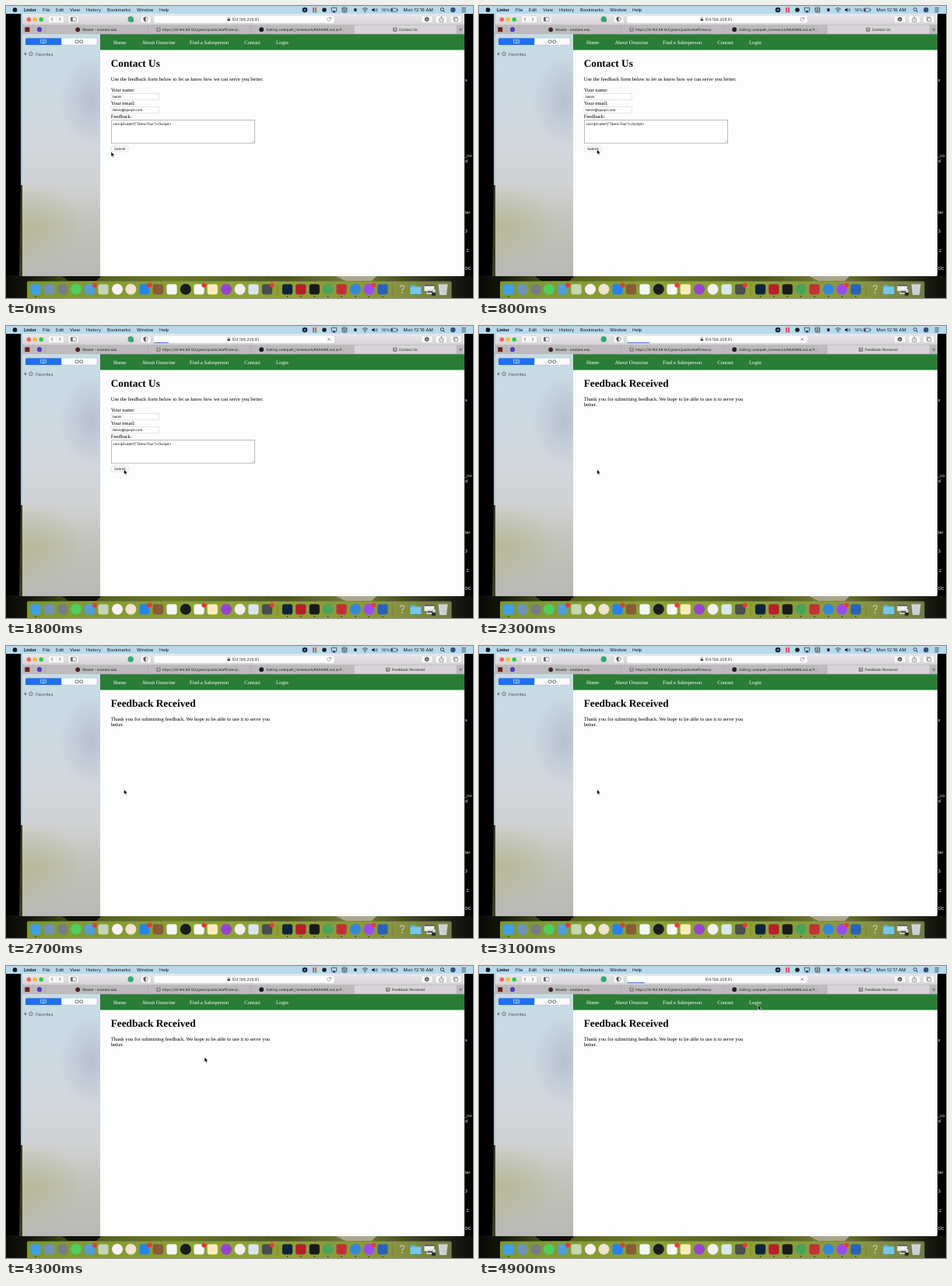
Animation of 600x375 px, one loop 5000 ms. Source, as an HTML page:

```html
<!DOCTYPE html>
<html lang="en">
<head>
<meta charset="utf-8">
<title>Feedback form</title>
<style>
  html, body { margin: 0; width: 100%; height: 100%; overflow: hidden; background: #000; }
  svg { display: block; width: 100vw; height: 100vh; }
  text { font-family: Inter, "Liberation Sans", sans-serif; text-rendering: geometricPrecision; white-space: pre; }
  .serif { font-family: "Liberation Serif", "Noto Serif", serif; }
</style>
</head>
<body>
<svg id="stage" viewBox="0 0 600 375" preserveAspectRatio="none">
  <defs>
    <linearGradient id="bar" x2="0" y2="1">
      <stop stop-color="#e9e7e9"/><stop offset="1" stop-color="#d5d3d5"/>
    </linearGradient>
    <linearGradient id="side" x2="0" y2="1">
      <stop stop-color="#c6dce6"/><stop offset=".25" stop-color="#cbd9e1"/>
      <stop offset=".45" stop-color="#d2d7dc"/><stop offset=".62" stop-color="#d0d2d3"/>
      <stop offset=".8" stop-color="#c0c1ba"/><stop offset="1" stop-color="#b9b8b5"/>
    </linearGradient>
    <radialGradient id="moss">
      <stop stop-color="#b4b78c" stop-opacity=".75"/><stop offset="1" stop-color="#b4b78c" stop-opacity="0"/>
    </radialGradient>
    <radialGradient id="mist">
      <stop stop-color="#b4bccd" stop-opacity=".85"/><stop offset="1" stop-color="#b4bccd" stop-opacity="0"/>
    </radialGradient>
    <linearGradient id="grass">
      <stop stop-color="#080907"/><stop offset=".05" stop-color="#14170b"/>
      <stop offset=".15" stop-color="#4a5620"/><stop offset=".35" stop-color="#6b7a28"/>
      <stop offset=".6" stop-color="#4b5621"/><stop offset=".75" stop-color="#77803a"/>
      <stop offset=".92" stop-color="#2b2a1a"/><stop offset="1" stop-color="#0c0d09"/>
    </linearGradient>
    <linearGradient id="dock">
      <stop stop-color="#7f9730"/><stop offset=".5" stop-color="#8fa338"/>
      <stop offset=".85" stop-color="#8a9640"/><stop offset="1" stop-color="#6f7a48"/>
    </linearGradient>
    <clipPath id="sideClip"><rect x="21" y="36" width="100" height="311"/></clipPath>
  </defs>
</svg>
<script>
const NS = 'http://www.w3.org/2000/svg';
const stage = document.getElementById('stage');
let parent = stage;

function add(tag, attrs, content) {
  const el = document.createElementNS(NS, tag);
  for (const key in attrs) el.setAttribute(key, attrs[key]);
  if (content !== undefined) el.textContent = content;
  return parent.appendChild(el);
}
const rect = (x, y, width, height, fill, rx = 0, more) => add('rect', { x, y, width, height, fill, rx, ...more });
const circle = (cx, cy, r, fill, more) => add('circle', { cx, cy, r, fill, ...more });
const line = (d, stroke, width = 0.7, more) =>
  add('path', { d, stroke, 'stroke-width': width, fill: 'none', ...more });
const shape = (d, fill, more) => add('path', { d, fill, ...more });
const label = (x, y, size, str, fill = '#222', more) =>
  add('text', { x, y, 'font-size': size, fill, ...more }, str);
const serif = (x, y, str, size = 6.65, fill = '#000', more) =>
  label(x, y, size, str, fill, { class: 'serif', ...more });
function group(draw) {
  const outer = parent, g = add('g', {});
  parent = g;
  draw();
  parent = outer;
  return g;
}
const show = (el, on) => el.setAttribute('visibility', on ? 'visible' : 'hidden');

function desktop() {
  rect(0, 0, 600, 375, '#000');
  rect(0, 346, 600, 29, 'url(#grass)');
  rect(19, 10, 2.5, 220, '#a8c6d6');
  shape('M19 230H22V347H17Z', '#3a4020');
  shape('M72 347L80 353H116L122 347Z', '#0e100a');
  shape('M424 347L436 353H470L476 347Z', '#aaa68a');
  const clipped = [[97, 's'], [194, '_co'], [201, 'd'], [267, 'ter'], [291, '3'], [316, ' 2'], [339, 'OC']];
  for (const [y, str] of clipped) label(589.5, y, 5.6, str, '#f2f2f2');
}

function menuBar() {
  rect(0, 0, 600, 10, '#b6d9ee');
  circle(11.5, 4.9, 2.9, '#1b1b1b');
  label(23, 7, 5.7, 'Lintor', '#111', { 'font-weight': 700 });
  const menus = [[47, 'File'], [64, 'Edit'], [82, 'View'], [103, 'History'],
    [130, 'Bookmarks'], [168, 'Window'], [197, 'Help']];
  for (const [x, str] of menus) label(x, 7, 5.65, str, '#111');

  const ink = '#1c2026';
  circle(384, 5, 3.3, ink);
  circle(384, 5, 1.3, '#4a90d8');
  rect(394.3, 1.8, 1.6, 6.6, '#d8392f');
  rect(397.2, 1.8, 1.6, 6.6, '#d8392f');
  circle(409, 5, 2.8, ink);
  line('M419.5 6.7H418.3V2.2H424.7V6.7H423.5', ink);
  shape('M421.5 5.2L423.8 8.3H419.2Z', ink);
  rect(432, 2, 5.8, 6, 'none', 0.8, { stroke: ink, 'stroke-width': 0.7 });
  line('M432 3.8H437.8M433.4 5.4H436.4M433.4 6.7H436.4', ink, 0.6);
  rect(447.3, 3.2, 3.2, 3.6, ink);
  line('M457.8 4.2Q461.3 .9 464.8 4.2M459.1 5.6Q461.3 3.5 463.5 5.6', ink, 0.8);
  circle(461.3, 7.1, 0.8, ink);
  shape('M470 4H471.4L473.4 2.2V7.8L471.4 6H470Z', ink);
  line('M474.5 3.5Q475.7 5 474.5 6.5M476 2.5Q477.9 5 476 7.5', ink, 0.6);
  label(482.6, 7, 5.2, '18%', ink);
  rect(494.3, 3, 8, 4.2, 'none', 0.7, { stroke: ink, 'stroke-width': 0.6 });
  rect(495, 3.7, 1.7, 2.8, ink);
  rect(502.7, 4.2, 0.8, 1.8, ink);
  circle(560.4, 4.4, 2, 'none', { stroke: ink, 'stroke-width': 0.8 });
  line('M561.9 5.9L563.6 7.8', ink, 0.9);
  circle(574.3, 5, 3.2, '#3d4a78');
  line('M585.5 2.6H591M585.5 5H591M585.5 7.4H591', ink, 0.8);
  return label(510.5, 7, 5.8, '', '#111');
}

function toolbar() {
  rect(21, 10, 568, 337, '#fdfdfd', 2);
  rect(21, 10, 568, 14.5, 'url(#bar)');
  ['#f95e56', '#f8bc32', '#2fc644'].forEach((c, i) => circle(29.3 + i * 8, 17.2, 2.7, c));
  const button = (x, w) => rect(x, 12.6, w, 9, '#fafafa', 1.5, { stroke: '#c4c2c4', 'stroke-width': 0.4 });
  button(54.5, 20);
  button(80, 13.3);
  button(173, 13);
  button(533.5, 14.5);
  button(552, 14.5);
  button(570.5, 14.5);
  const ink = '#555';
  line('M60.2 14.9L58.2 17.1L60.2 19.3M68 14.9L70 17.1L68 19.3', ink, 0.8);
  line('M64.5 13V21.5', '#d2d2d2', 0.4);
  rect(83.2, 14.6, 7, 5, 'none', 0.4, { stroke: ink, 'stroke-width': 0.6 });
  rect(83.4, 14.8, 2.2, 4.6, ink);
  line('M179.4 14L182 15V17.2Q181.8 19.2 179.4 20.3Q177 19.2 176.8 17.2V15Z', ink, 0.6);
  shape('M179.4 14V20.3Q177 19.2 176.8 17.2V15Z', ink);
  rect(190, 12.3, 232, 9.6, '#fff', 1.6, { stroke: '#c9c7c9', 'stroke-width': 0.4 });
  label(290, 19, 5.1, '104.198.208.81', '#333');
  circle(540.7, 17.1, 2.8, ink);
  line('M540.7 15.4V18.4M539.5 17.3L540.7 18.5L541.9 17.3', '#fff', 0.6);
  line('M558 16H556.8V20H561.8V16H560.6M559.3 18.2V13.8M558 15L559.3 13.8L560.6 15', ink, 0.6);
  line('M576.2 18.3H575.2V14.2H579.4V15.2', ink, 0.6);
  rect(576.3, 15.4, 4.3, 4.4, 'none', 0.3, { stroke: ink, 'stroke-width': 0.6 });
}

function tabBar() {
  rect(21, 24.3, 568, 11.9, '#bcbabc');
  rect(447, 24.3, 132.2, 11.9, '#d6d4d6');
  line('M21 24.4H589M21 36H589', '#a4a2a4', 0.4);
  for (const x of [35, 50, 182.3, 314.6, 447, 579.2]) line(`M${x} 24.5V36`, '#a09ea0', 0.4);
  rect(24.3, 27.2, 6, 6, '#6d1d22');
  circle(43, 30.2, 3.1, '#5b35c5');
  circle(92.2, 30.3, 2.9, '#46261d');
  label(98, 32, 4.45, 'Wexlet - msstate.edu');
  pageIcon(196);
  label(201, 32, 4.45, 'https://35.184.88.143/green/public/staff/users/...');
  circle(328.2, 30.2, 2.9, '#1c1c1e');
  label(334.6, 32, 4.45, 'Editing codepath_homework/README.md at P...');
  line('M584.2 28V32.4M582 30.2H586.4', '#555', 0.6);
}

function pageIcon(x) {
  rect(x - 2.7, 27.5, 5.4, 5.4, '#89878b', 0.8);
  line(`M${x - 0.6} 29L${x + 0.2} 28.6V31.8`, '#fff', 0.6);
}

function sidebar() {
  rect(21, 36.2, 100, 310.8, 'url(#side)');
  const glow = (cx, cy, rx, ry, id) =>
    add('ellipse', { cx, cy, rx, ry, fill: `url(#${id})`, 'clip-path': 'url(#sideClip)' });
  glow(110, 122, 42, 60, 'mist');
  glow(30, 282, 70, 55, 'moss');
  rect(25, 41.2, 92, 8.8, '#fbfbfb', 1.6, { stroke: '#b5b9be', 'stroke-width': 0.4 });
  shape('M26.6 41.2H71.2V50H26.6Q25 50 25 48.4V42.8Q25 41.2 26.6 41.2Z', '#2070f2');
  line('M48 44.1V47.9Q46.3 46.9 44.6 47.5V43.7Q46.3 43.2 48 44.1Q49.7 43.2 51.4 43.7V47.5Q49.7 46.9 48 47.9', '#fff', 0.6);
  circle(91, 45.8, 2, 'none', { stroke: '#444', 'stroke-width': 0.7 });
  circle(96.8, 45.8, 2, 'none', { stroke: '#444', 'stroke-width': 0.7 });
  line('M93 45.4Q93.9 44.8 94.8 45.4', '#444', 0.6);
  shape('M23.8 59.6L27 61.5L23.8 63.4Z', '#6e6e70');
  const star = Array.from({ length: 10 }, (_, i) => {
    const a = i * Math.PI / 5, r = i % 2 ? 1.4 : 3.2;
    return `${32 + r * Math.sin(a)},${61.6 - r * Math.cos(a)}`;
  }).join(' ');
  add('polygon', { points: star, fill: 'none', stroke: '#555', 'stroke-width': 0.6 });
  label(38, 63.5, 5.2, 'Favorites', '#444');
}

function siteHeader() {
  rect(121, 36.2, 468, 20.3, '#2b7c36');
  const links = [[138, 'Home'], [174.5, 'About Ornavine'], [236, 'Find a Salesperson'],
    [306.3, 'Contact'], [347, 'Login']];
  for (const [x, str] of links) serif(x, 48.9, str, 6.65, '#fff');
}

const heading = str => serif(134.7, 77.6, str, 13.3, '#000', { 'font-weight': 700 });

function contactPage() {
  pageIcon(499.8);
  label(504.8, 32, 4.55, 'Contact Us');
  circle(162.6, 18.8, 1.6, '#777');
  heading('Contact Us');
  serif(134.7, 96, 'Use the feedback form below to let us know how we can serve you better.');
  const field = (y, name, value) => {
    serif(134.7, y, name);
    rect(135, y + 2.2, 61.5, 8, '#fff', 0, { stroke: '#c6c6c6', 'stroke-width': 0.5 });
    label(137, y + 8, 4.5, value, '#000');
  };
  field(110, 'Your name:', 'tamiv');
  field(127, 'Your email:', 'tamiv@quopl.com');
  serif(134.7, 144.2, 'Feedback:');
  rect(135.3, 146.7, 184.4, 29.4, '#fff', 0, { stroke: '#8e8e8e', 'stroke-width': 0.6 });
  label(137, 152.5, 4.5, "<script>alert('Tamiv four')<\/script>", '#000');
  line('M315.8 175.2L318.9 172.1M317.6 175.2L318.9 173.9', '#888', 0.4);
  rect(135.3, 180, 21.8, 7, '#fff', 1.3, { stroke: '#c2c2c2', 'stroke-width': 0.5 });
  label(146.3, 185.2, 4.5, 'Submit', '#000', { 'text-anchor': 'middle' });
}

function thanksPage() {
  pageIcon(490.6);
  label(495.8, 32, 4.55, 'Feedback Received');
  heading('Feedback Received');
  serif(134.7, 96, 'Thank you for submitting feedback. We hope to be able to use it to serve you');
  serif(134.7, 103.4, 'better.');
}

function dock() {
  rect(27, 353.5, 545.5, 24, 'url(#dock)', 2);
  const square = (x, c) => rect(x - 6.6, 357.2, 13.2, 13.2, c, 2.8);
  const disc = (x, c) => circle(x, 363.8, 7, c);
  const squares = [[38, '#3f9fe8'], [55.5, '#6d93b4'], [107.5, '#4f9ed6'], [125, '#c3d6b4'], [178, '#2484ee'],
    [195.3, '#8a5b35'], [213, '#f5f5f5'], [248, '#f7f7f7'], [265.3, '#f8eeb5'],
    [318, '#d9e5ee'], [335.6, '#4b4d50'], [361.5, '#10243b'], [378.8, '#b3202a'],
    [396.3, '#19191b'], [431, '#c03236'], [484, '#2a62b8']];
  const discs = [[73, '#777d83'], [90, '#4fcf5c'], [143, '#f8f1f3'], [160.4, '#f0e3d0'], [230.8, '#1b1b1d'],
    [283, '#9a43cf'], [300.5, '#f3eef0'], [413.6, '#4aa45c'], [449, '#3289d8'], [466.3, '#9a4cf0']];
  squares.forEach(args => square(...args));
  discs.forEach(args => disc(...args));
  for (const x of [114, 184.5, 254.3, 341.6, 472.3]) circle(x, 358.6, 3, '#ea3a32');
  line('M349 356V372M497 356V372', '#66702f', 0.5);
  for (const x of [38, 361.5, 378.8, 396.3, 413.6, 431, 449, 466.3, 484]) circle(x, 373.3, 0.8, '#222');
  label(509, 369.2, 14.5, '?', '#c3c9a2', { 'text-anchor': 'middle' });
  shape('M519.5 358.5H525L526.5 360H533.3V370H519.5Z', '#60b8df');
  rect(519.5, 361.5, 13.8, 8.5, '#75c8ea', 0.8);
  rect(537.5, 358, 12.5, 8, '#f0f0f0');
  rect(537.5, 358, 12.5, 1.7, '#555');
  rect(540.5, 364, 11, 6, '#d8d8d8');
  rect(541.5, 366, 7, 2.2, '#555');
  rect(547, 368, 5, 4, '#27292b', 1);
  shape('M555.6 357.2H567.4L565.8 371H557.2Z', '#d9dcd8', { stroke: '#a8abab', 'stroke-width': 0.5 });
  line('M555.4 357.6H567.6M558.8 359L559.6 369.5M561.5 359V369.5M564.2 359L563.4 369.5', '#a5a8a8', 0.6);
}

desktop();
const clock = menuBar();
toolbar();
circle(160.2, 17, 3.7, '#35a879');
const lock = group(() => {
  rect(284.5, 16.4, 3.5, 2.7, '#444', 0.4);
  line('M285.2 16.5V15.5Q286.25 13.8 287.3 15.5V16.5', '#444', 0.6);
});
const reload = group(() => {
  line('M417 16A2.2 2.2 0 1 0 417.3 17.6', '#666', 0.6);
  shape('M417.7 14.2V16.6H415.5Z', '#666');
});
const stop = group(() => line('M413.2 15.2L417 19M417 15.2L413.2 19', '#666', 0.7));
const progress = rect(190.5, 21, 0, 1, '#2f7de1');
tabBar();
sidebar();
siteHeader();
const contact = group(contactPage);
const thanks = group(thanksPage);
dock();
const cursor = group(() => shape('M0 0V6.6L1.5 5.3L2.5 7.6L3.6 7.1L2.6 4.9H4.7Z', '#000',
  { stroke: '#fff', 'stroke-width': 0.6, 'stroke-linejoin': 'round' }));

const LOOP = 5000, SWAP = 1900, MINUTE = 4400;
// time, x, y
const path = [[300, 135, 187], [700, 151.5, 184], [3900, 151.5, 184], [4700, 358.5, 50]];
// start, end, bar width at start and end
const loads = [[1500, 2700, 12, 37], [4700, LOOP, 18, 24]];

function pointer(t) {
  if (t <= path[0][0]) return path[0].slice(1);
  for (let i = 1; i < path.length; i++) {
    const [t0, x0, y0] = path[i - 1], [t1, x1, y1] = path[i];
    if (t > t1) continue;
    const u = (t - t0) / (t1 - t0), e = u * u * (3 - 2 * u);
    return [x0 + (x1 - x0) * e, y0 + (y1 - y0) * e];
  }
  return path[path.length - 1].slice(1);
}

function render(t) {
  const [x, y] = pointer(t);
  cursor.setAttribute('transform', `translate(${x} ${y})`);
  show(contact, t < SWAP);
  show(thanks, t >= SWAP);
  const load = loads.find(([from, to]) => t >= from && t < to);
  show(stop, load);
  show(reload, !load);
  show(lock, t < 4700);
  show(progress, load);
  if (load) {
    const [from, to, w0, w1] = load;
    progress.setAttribute('width', w0 + (w1 - w0) * (t - from) / (to - from));
  }
  clock.textContent = t < MINUTE ? 'Mon 12:16 AM' : 'Mon 12:17 AM';
}

const start = performance.now();
function tick() {
  const t = (performance.now() - start) % LOOP;
  render(Math.floor(t / 100) * 100);
  requestAnimationFrame(tick);
}
tick();
</script>
</body>
</html>
```
